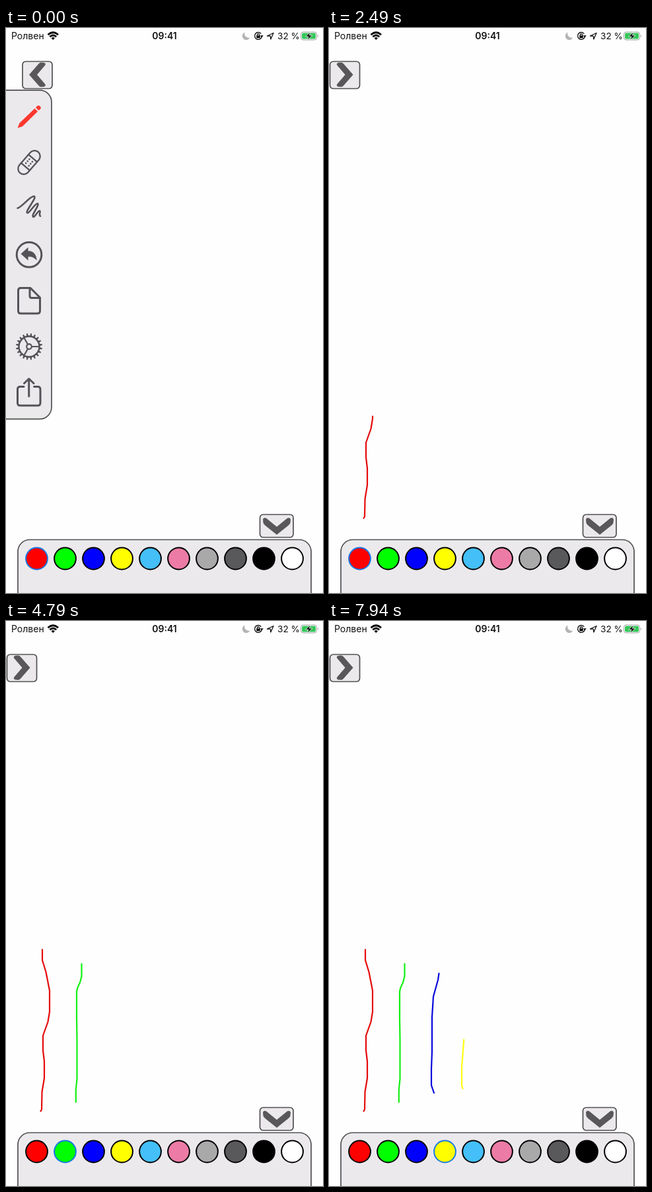
Animation of 480 by 853 pixels, one loop 7.99 s. Source, as an HTML page:

```html
<!DOCTYPE html>
<html lang="ru">
<head>
<meta charset="utf-8">
<title>Drawing pad</title>
<style>
  html, body { margin: 0; width: 100%; height: 100%; overflow: hidden; background: #fefefe; }
  svg { display: block; width: 100%; height: 100%; }
  text { font-family: Inter, Roboto, sans-serif; font-size: 14px; fill: #111; }
  .box { fill: #ebe9ec; stroke: #505052; stroke-width: 1.7; }
  .chevron { fill: #59575a; }
  .line { fill: none; stroke: #555358; stroke-width: 3; stroke-linecap: round; stroke-linejoin: round; }
  .solid { fill: #555358; }
  .ink { fill: none; stroke-width: 2.2; stroke-linecap: round; stroke-linejoin: round; }
</style>
</head>
<body>
<svg viewBox="0 0 480 853" preserveAspectRatio="none">
  <g id="status">
    <text x="8" y="17">Ролвен</text>
    <g fill="none" stroke="#000" stroke-width="2.7">
      <path d="M63.5 10.2Q71.200 3.300 79 10.2"/>
      <path d="M66.300 13.200Q71.200 8.800 76.200 13.200"/>
    </g>
    <path d="M68.600 15.200Q71.200 13 73.900 15.200L71.200 18Z"/>
    <text x="240" y="17" text-anchor="middle" font-weight="600">09:41</text>
    <path fill="#b4b4b6" d="M361.500 6.500A6 6 0 1 0 369.300 14.500A6.300 6.300 0 0 1 361.500 6.500Z"/>
    <path fill="none" stroke="#111" stroke-width="1.4" d="M386.300 8.700A5.400 5.400 0 1 0 387.300 12.800M380.400 12v-1.500a1.600 1.600 0 0 1 3.200 0V12"/>
    <path d="M379.300 11.500h5.400v3.800h-5.400ZM384.800 11.300h5l-2.500 3Z"/>
    <path fill="none" stroke="#111" stroke-width="1.3" stroke-linejoin="round" d="M395.500 12L405 7.500L400.800 17L400.300 12.200Z"/>
    <text x="411" y="17" style="font-size:13.6px">32 %</text>
    <rect x="446.500" y="6" width="24" height="12" rx="3.500" fill="#fff" stroke="#a0a0a2"/>
    <rect x="448" y="7.500" width="21" height="9" rx="2" fill="#35c759"/>
    <path d="M472 10q2 2 0 4Z" fill="#a0a0a2"/>
    <path d="M461.500 5.500L453.500 13H458L455.800 18.500L464 11H459.300Z" stroke="#fff" stroke-width=".8"/>
  </g>

  <g id="tools">
    <rect class="box" x="-40" y="93.800" width="109" height="496.500" rx="18"/>
    <g fill="#fb372e">
      <path d="M17.500 151L20.500 143.500L43.500 121.500L48 126L25 148.500Z"/>
      <path d="M45 120L48 117.300Q49.500 116.300 51 117.800L52.500 119.300Q53.500 121 52 122.300L49.300 124.500Z"/>
    </g>
    <g transform="translate(35 203) rotate(-49)">
      <rect class="line" x="-21" y="-8.500" width="42" height="17" rx="8.500" style="stroke-width:2.300"/>
      <path class="line" d="M-8.500-8.500v17M8.500-8.500v17" style="stroke-width:2.300"/>
      <g id="dots" class="solid"></g>
    </g>
    <path class="line" style="stroke-width:2.600" d="M17.500 272C25 270 35 255 42 254C49 254 29 276 32 279C35 281 44 264 48 265C51 268 38 282 41 285C43 287 48 276 51 276C53 277 49 282 52 284"/>
    <circle class="line" cx="35" cy="342.300" r="18.800"/>
    <path class="solid" d="M22.500 341L33.500 331V336.500Q46 337 46.500 351Q41 344.500 33.500 345.500V351Z"/>
    <path class="line" d="M22 392.500H37L51.500 407V427Q51.500 431 47.500 431H22.500Q18.500 431 18.500 427V396.500Q18.500 392.500 22 392.500ZM36 393V404.500Q36 407.500 39 407.500H51"/>
    <g transform="translate(35 481)">
      <circle class="line" r="15.500" style="stroke-width:2.400"/>
      <circle class="line" r="3.800" style="stroke-width:2.200"/>
      <path class="line" d="M4 0H15M-2 -3.500L-7.500-13M-2 3.500L-7.500 13" style="stroke-width:2.200"/>
      <g id="teeth" class="solid"></g>
    </g>
    <path class="line" d="M27 541.500H21.500Q17.500 541.500 17.500 545.500V566Q17.500 570 21.500 570H48Q52 570 52 566V545.500Q52 541.500 48 541.500H42.500M34.700 556V530M27.500 536.500L34.700 529.500L42 536.500"/>
  </g>

  <g id="toggle">
    <rect class="box" x="25" y="50.500" width="45" height="41" rx="5"/>
    <path id="arrow" class="chevron" d="M-12.500 0L2-16.500Q3.500-18.500 6-18.500L10.500-18Q13.500-16.500 11.500-14L-.5 0L11.500 14Q13.500 16.500 10.500 18L6 18.500Q3.500 18.500 2 16.500Z"/>
  </g>

  <g id="inks"></g>

  <rect class="box" x="384.500" y="734.500" width="50.500" height="34.500" rx="5"/>
  <path class="chevron" d="M389 742Q390 738.500 394 740L410 753L426 740Q430 738.500 431 742L430.500 747Q430 749.500 427 751.500L410 765L393 751.500Q390 749.500 389.500 747Z"/>
  <rect class="box" x="18" y="772.500" width="444" height="110" rx="18"/>
  <g id="palette"></g>
</svg>
<script>
const LOOP = 7990;
const COLORS = ['#f00', '#0f0', '#00f', '#ff0', '#44bff8', '#ec7ba5', '#aaa9aa', '#59585a', '#000', '#fff'];
// pick: swatch is chosen; from/to: the line is drawn
const STROKES = [
  { color: '#e60b0b', pick: 0, from: 1710, to: 2950,
    d: 'M52.500 740L54 737.500L54.500 711L58 690V665L56 648V626L63.500 605L66 590V558L60.500 530L55 512V496' },
  { color: '#12f012', pick: 3400, from: 3750, to: 4680,
    d: 'M105.800 726.500V708L107.500 691V632L107 600V560Q107.500 554 112 546L114.500 536V517.500' },
  { color: '#0808dc', pick: 5250, from: 5680, to: 6580,
    d: 'M159 712.500L155 701V676L156 650V598L158 567L165 542L166.500 532' },
  { color: '#ffff12', pick: 7150, from: 7600, to: 7960,
    d: 'M202.500 706L201 701V674L203 648L204.500 628' }
];

const $ = id => document.getElementById(id);
function add(parent, tag, attrs) {
  const node = document.createElementNS('http://www.w3.org/2000/svg', tag);
  for (const key in attrs) node.setAttribute(key, attrs[key]);
  return parent.appendChild(node);
}
const clamp = v => Math.max(0, Math.min(1, v));
const progress = (t, from, to) => clamp((t - from) / (to - from));
const ease = p => p < .5 ? 4 * p ** 3 : 1 - (2 - 2 * p) ** 3 / 2;

for (const x of [-4, 0, 4])
  for (const y of [-3, 3]) add($('dots'), 'circle', { cx: x, cy: y, r: 1.3 });
for (let i = 0; i < 20; i++)
  add($('teeth'), 'path', { d: 'M-1.800-15.500L-.8-20H.8L1.800-15.500Z', transform: `rotate(${i * 18 + 9})` });

const swatches = COLORS.map((fill, i) =>
  add($('palette'), 'circle', { cx: 46.5 + 43 * i, cy: 801, r: 16.4, fill, 'stroke-width': 2 }));
const lines = STROKES.map(({ d, color }) =>
  add($('inks'), 'path', { class: 'ink', d, stroke: color }));
const lengths = lines.map(line => line.getTotalLength());

function draw(t) {
  const slide = ease(progress(t, 300, 600));
  $('tools').setAttribute('transform', `translate(${-70.5 * slide} 0)`);
  $('toggle').setAttribute('transform', `translate(${-23.5 * slide} 0)`);
  $('arrow').setAttribute('transform', `translate(47.5 70.5) scale(${t < 300 ? 1 : -1} 1)`);
  $('arrow').style.fill = t >= 220 && t < 640 ? '#8b898c' : '';

  const chosen = STROKES.filter(s => t >= s.pick).length - 1;
  swatches.forEach((s, i) => s.setAttribute('stroke', i === chosen ? '#1877e6' : '#000'));

  STROKES.forEach((s, i) => {
    const p = progress(t, s.from, s.to);
    lines[i].style.display = p ? '' : 'none';
    lines[i].setAttribute('stroke-dasharray', `${lengths[i] * p} ${lengths[i] + 10}`);
  });
}

const start = performance.now();
function tick() {
  draw((performance.now() - start) % LOOP);
  requestAnimationFrame(tick);
}
tick();
</script>
</body>
</html>
```
